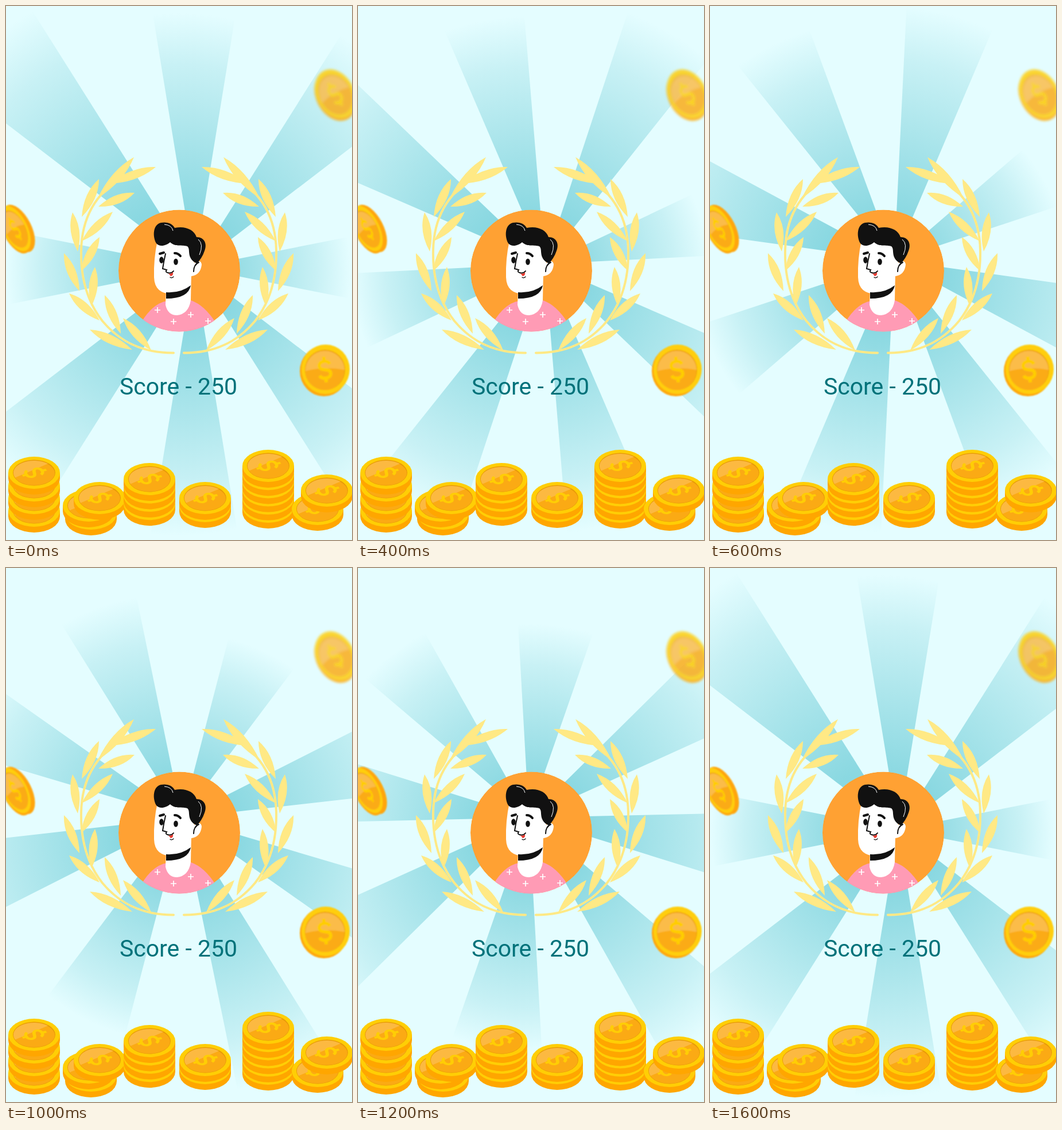
Animation, 603 px wide and 929 px high, one loop 1800 ms. Source, as an HTML page:

```html
<!DOCTYPE html>
<html>
<head>
<meta charset="utf-8">
<style>
  html, body { margin: 0; width: 100%; height: 100%; overflow: hidden; background: #e4fdff; }
  svg { display: block; }
</style>
</head>
<body>
<svg width="603" height="929" viewBox="0 0 603 929">
  <defs>
    <clipPath id="disc"><circle cx="302" cy="460.500" r="106"/></clipPath>
    <filter id="soft1" x="-20%" y="-20%" width="140%" height="140%"><feGaussianBlur stdDeviation="0.9"/></filter>
    <filter id="soft2" x="-20%" y="-20%" width="140%" height="140%"><feGaussianBlur stdDeviation="2.3"/></filter>
    <path id="dollar" d="M8-8C5-16-10-14-8-5C-6 2 8-3 8 6C8 14-6 15-9 8M0-13V-20M0 12V19" fill="none" stroke="#ffcd05" stroke-width="5"/>
    <g id="coin">
      <path d="M-45 0V10A45 28 0 0 0 45 10V0Z" fill="#ffa600"/>
      <ellipse rx="45" ry="28" fill="#ffce05"/>
      <ellipse rx="37" ry="22.500" fill="#e89a08"/>
      <ellipse cy="0.800" rx="36" ry="21" fill="#fbaa14"/>
      <path d="M-33 8.400A36 21 0 0 1 24-15.700Z" fill="#fcb941"/>
      <use href="#dollar" transform="scale(1.15 .72) rotate(68)"/>
    </g>
    <g id="flying">
      <ellipse cx="-2" cy="2" rx="42" ry="44" fill="#ffa90a"/>
      <ellipse cx="1" cy="-1" rx="42" ry="43" fill="#ffce0a"/>
      <circle r="35" fill="#eea00c"/>
      <circle cx="-.5" cy="1" r="34" fill="#fbab18"/>
      <path d="M-34 2A34 34 0 0 1 34 0Q0-7-34 2Z" fill="#fbbc49"/>
      <use href="#dollar" transform="rotate(-6) scale(1.15)"/>
    </g>
  </defs>

  <g id="rays"></g>
  <g id="laurel" fill="#ffe985"></g>

  <g clip-path="url(#disc)">
    <circle cx="302" cy="460.500" r="106" fill="#ffa133"/>
    <path d="M236 550Q256 517 281 513L322 512Q346 520 366 552V570H236Z" fill="#ff9bb5"/>
    <path d="M279 490L278 520Q282 538 298 538Q318 536 322 512L323 465Z" fill="#fff"/>
    <path d="M264 408Q257 440 258 472Q259 501 290 501Q315 496 323 470Q339 468 341 450Q340 440 328 447L322 405Z" fill="#fff"/>
    <path d="M279 498Q304 500 322 486Q318 509 279 509Z" fill="#111"/>
    <path d="M262 413C255 401 256 380 270 377C282 375 290 379 294 386C312 382 328 389 332 402C346 402 351 414 346 426C343 435 338 442 333 448C329 446 325 444 322 439C317 430 321 422 316 418C307 415 296 420 286 411C279 417 268 420 262 413Z" fill="#111"/>
    <g fill="none" stroke="#fff" stroke-width="1">
      <path d="M276 380Q289 381 291 391M335 406Q345 414 337 433"/>
    </g>
    <g fill="none" stroke="#111" stroke-width="2" stroke-linecap="round">
      <path d="M278 431Q275 444 273 457L280 459Q277 463 282 464Q288 466 292 461M336 446Q327 450 327 462"/>
      <path d="M268 431L275 429M294 430Q300 430 304 435" stroke-width="4"/>
      <path d="M286 472Q289 474 292 471" stroke-width="1.300"/>
    </g>
    <path d="M283 465Q288 467 291 463Q292 469 287 470Z" fill="#e8392f"/>
    <ellipse cx="271" cy="442" rx="3.800" ry="5.700" fill="#111"/>
    <ellipse cx="296" cy="445" rx="3.800" ry="5.500" fill="#111"/>
    <path d="M259 529h10m-5-5v10M287 549h10m-5-5v10M317 537h10m-5-5v10M347 548h10m-5-5v10" stroke="#fff" stroke-width="1.700"/>
  </g>

  <text x="300.500" y="676" text-anchor="middle" font-family="Roboto, sans-serif" font-size="41" fill="#00727a">Score - 250</text>

  <g id="stacks"></g>
  <use href="#flying" transform="translate(556 633)" filter="url(#soft1)"/>
  <g filter="url(#soft2)" opacity=".84"><use href="#flying" transform="translate(574 154) rotate(-28) scale(.78 1.040)"/></g>
  <g filter="url(#soft1)" transform="translate(16 388) rotate(-27)">
    <ellipse cx="6" cy="2" rx="22" ry="45" fill="#ffa507"/>
    <use href="#flying" transform="scale(.5 1)"/>
  </g>
</svg>
<script>
const $ = id => document.getElementById(id);

// Laurel leaves: base x, base y, tip x, tip y
const leaves = [
  [160, 334, 223, 263], [180, 309, 261, 280], [132, 367, 162, 301], [161, 349, 224, 325],
  [125, 427, 116, 359], [132, 409, 186, 358], [128, 496, 101, 430], [131, 461, 163, 402],
  [163, 547, 110, 500], [149, 522, 155, 454], [220, 598, 146, 563], [200, 570, 172, 503],
  [253, 599, 204, 543]
];
const leafPath = ([x, y, u, v]) => {
  const dx = u - x, dy = v - y, k = 15 / Math.hypot(dx, dy);
  const side = s => `${x + dx * .55 - s * dy * k} ${y + dy * .55 + s * dx * k}`;
  return `M${x} ${y}Q${side(1)} ${u} ${v}Q${side(-1)} ${x} ${y}Z`;
};
const branch = `<path d="${leaves.map(leafPath).join('')}"/>
  <path d="M292 603.500C240 604 200 586 168 548C142 515 130 472 131 425C132 375 150 330 202 298"
    fill="none" stroke="#ffe985" stroke-width="4" stroke-linecap="round"/>`;
$('laurel').innerHTML = branch + `<g transform="translate(602 0) scale(-1 1)">${branch}</g>`;

// Coin stacks: x, y of the top face, coin count, spacing
const stacks = [
  [49, 812, 4, 22], [148, 883, 1, 0], [144, 869, 1, 0], [163, 856, 1, 0], [250, 823, 4, 14.400],
  [347, 856, 2, 14], [457, 800, 6, 14.200], [543, 875, 1, 0], [559, 843, 1, 0]
];
$('stacks').innerHTML = stacks.map(([x, y, count, gap]) =>
  Array.from({ length: count }, (_, i) =>
    `<use href="#coin" x="${x}" y="${y + (count - 1 - i) * gap}"/>`).join('')).join('');

// Eight rays around a hub that lies off the turning point
const HUB = [27, -7], HALF = 10.200, STRETCH = 1.1;
const reachStart = [450, 500, 300, 490, 460, 450, 300, 520];
const reachEnd = [420, 395, 365, 460, 460, 460, 380, 450];
const edge = deg => {
  const a = deg * Math.PI / 180;
  return `${HUB[0] + 900 * Math.sin(a)} ${HUB[1] - 900 * STRETCH * Math.cos(a)}`;
};
$('rays').innerHTML = reachStart.map((r, k) => `
  <radialGradient id="fade${k}" gradientUnits="userSpaceOnUse" cx="0" cy="0" r="${r}">
    <stop offset=".22" stop-color="#8ad8e1"/><stop offset=".55" stop-color="#ade6ec"/>
    <stop offset=".8" stop-color="#c8f1f5"/><stop offset="1" stop-color="#e4fdff"/>
  </radialGradient>
  <path fill="url(#fade${k})" d="M${HUB}L${edge(45 * k - HALF)}L${edge(45 * k + HALF)}Z"/>`).join('');

// The turn advances in 200 ms steps, gathers speed, then snaps back
const STEP = 200, turns = [0, 4, 14, 29.500, 46.500, 64.200, 82, 98, 0];
function draw(now) {
  const turn = turns[Math.floor(now / STEP) % turns.length];
  $('rays').setAttribute('transform', `translate(301 462) rotate(${-turn})`);
  reachStart.forEach((r, k) =>
    $('fade' + k).setAttribute('r', r + (reachEnd[k] - r) * turn / 82));
}
const start = performance.now();
function tick() {
  draw(performance.now() - start);
  requestAnimationFrame(tick);
}
tick();
</script>
</body>
</html>
```
